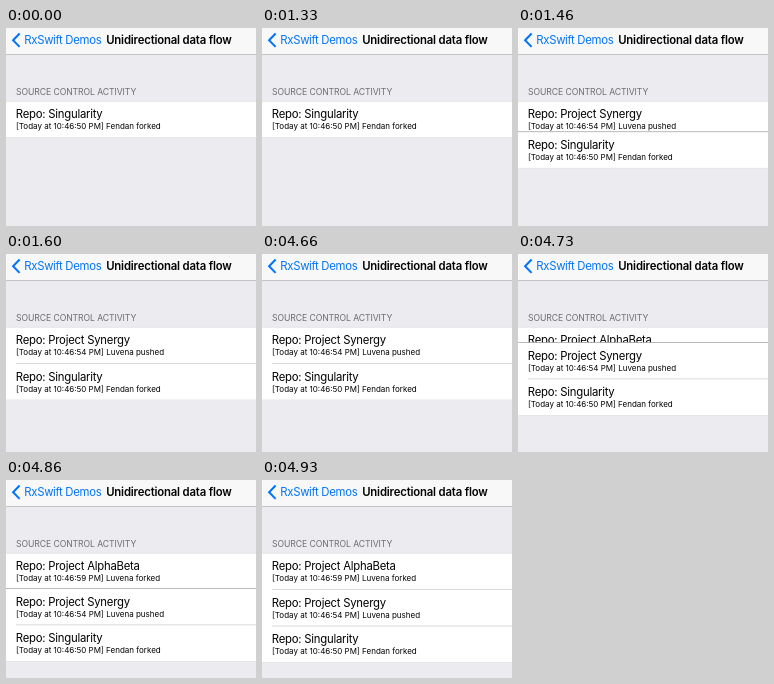
Recreate the animation shown at these times as an HTML page. Size 250 px wide and 198 px high, loop 5030 ms.

```html
<!DOCTYPE html>
<html lang="en">
<head>
<meta charset="utf-8">
<title>Unidirectional data flow</title>
<style>
  html, body { margin: 0; width: 100%; height: 100%; overflow: hidden; background: #ebebf0; }
  svg { display: block; width: 100%; height: 100%; }
  text { font-family: Inter, Roboto, sans-serif; font-size: 11.33px; letter-spacing: -.24px; fill: #000; white-space: pre; }
  .back { fill: #0074f8; letter-spacing: -.3px; }
  .title { font-weight: 600; letter-spacing: -.17px; }
  .section { font-size: 8.67px; letter-spacing: -.1px; fill: #6d6d72; }
  .detail { font-size: 8px; letter-spacing: 0; }
</style>
</head>
<body>
<svg viewBox="0 0 250 198" xmlns="http://www.w3.org/2000/svg">
  <rect width="250" height="198" fill="#ebebf0"/>
  <rect width="250" height="26.3" fill="#f8f8f8"/>
  <rect y="26.2" width="250" height=".7" fill="#b2b2b5"/>
  <path d="M13.6 5.5 L7.1 12.2 L13.6 18.9" fill="none" stroke="#0074f8" stroke-width="2"/>
  <text class="back" x="18.3" y="16.4">RxSwift Demos</text>
  <text class="title" x="100.2" y="16.4">Unidirectional data flow</text>
  <text class="section" x="10" y="66.6">SOURCE CONTROL ACTIVITY</text>
  <g id="list"></g>
</svg>
<script>
const LOOP = 5030, TOP = 73.2, PITCH = 36.4, LINE = .67;
const EDGE = '#dcdce0', DIVIDER = '#c8c7cc', MOVING = '#97979b';
const list = document.getElementById('list');

// Oldest first; steps are [time, share of a row opened above the older rows].
const entries = [
  { repo: 'Singularity', detail: '[Today at 10:46:50 PM] Fendan forked', steps: [[0, 1]] },
  { repo: 'Project Synergy', detail: '[Today at 10:46:54 PM] Luvena pushed',
    steps: [[1400, .42], [1460, .84], [1530, .97], [1600, 1]] },
  { repo: 'Project AlphaBeta', detail: '[Today at 10:46:59 PM] Luvena forked',
    steps: [[4730, .42], [4800, .84], [4860, .97], [4930, 1]] }
];

function add(parent, tag, attrs, content = '') {
  const node = document.createElementNS('http://www.w3.org/2000/svg', tag);
  for (const [name, value] of Object.entries(attrs)) node.setAttribute(name, value);
  node.textContent = content;
  return parent.appendChild(node);
}

// Newer rows lie beneath the older ones.
const rows = entries.map(entry => {
  const group = add(list, 'g', {});
  list.prepend(group);
  add(group, 'rect', { width: 250, height: PITCH + LINE / 2, fill: '#fff' });
  add(group, 'text', { x: 9.8, y: 17.3 }, 'Repo: ' + entry.repo);
  add(group, 'text', { class: 'detail', x: 9.9, y: 28.1 }, entry.detail);
  const line = add(group, 'rect', { y: -LINE / 2, height: LINE });
  return { ...entry, group, line };
});
add(rows[0].group, 'rect', { y: PITCH - LINE / 2, width: 250, height: LINE, fill: EDGE });

function openness(steps, time) {
  return steps.reduce((value, [start, share]) => time >= start ? share : value, 0);
}

function render(time) {
  let offset = 0, above = 1;
  for (let i = rows.length - 1; i >= 0; i--) {
    const row = rows[i], open = openness(row.steps, time);
    row.group.setAttribute('visibility', open ? 'visible' : 'hidden');
    row.group.setAttribute('transform', `translate(0 ${TOP + offset * PITCH})`);
    const moving = above < 1 && above > 0;
    const inset = offset > 0 && !moving ? 10 : 0;
    row.line.setAttribute('x', inset);
    row.line.setAttribute('width', 250 - inset);
    row.line.setAttribute('fill', moving ? MOVING : offset > 0 ? DIVIDER : EDGE);
    offset += open;
    above = open;
  }
}

const start = performance.now();
function tick() {
  render((performance.now() - start) % LOOP);
  requestAnimationFrame(tick);
}
tick();
</script>
</body>
</html>
```
